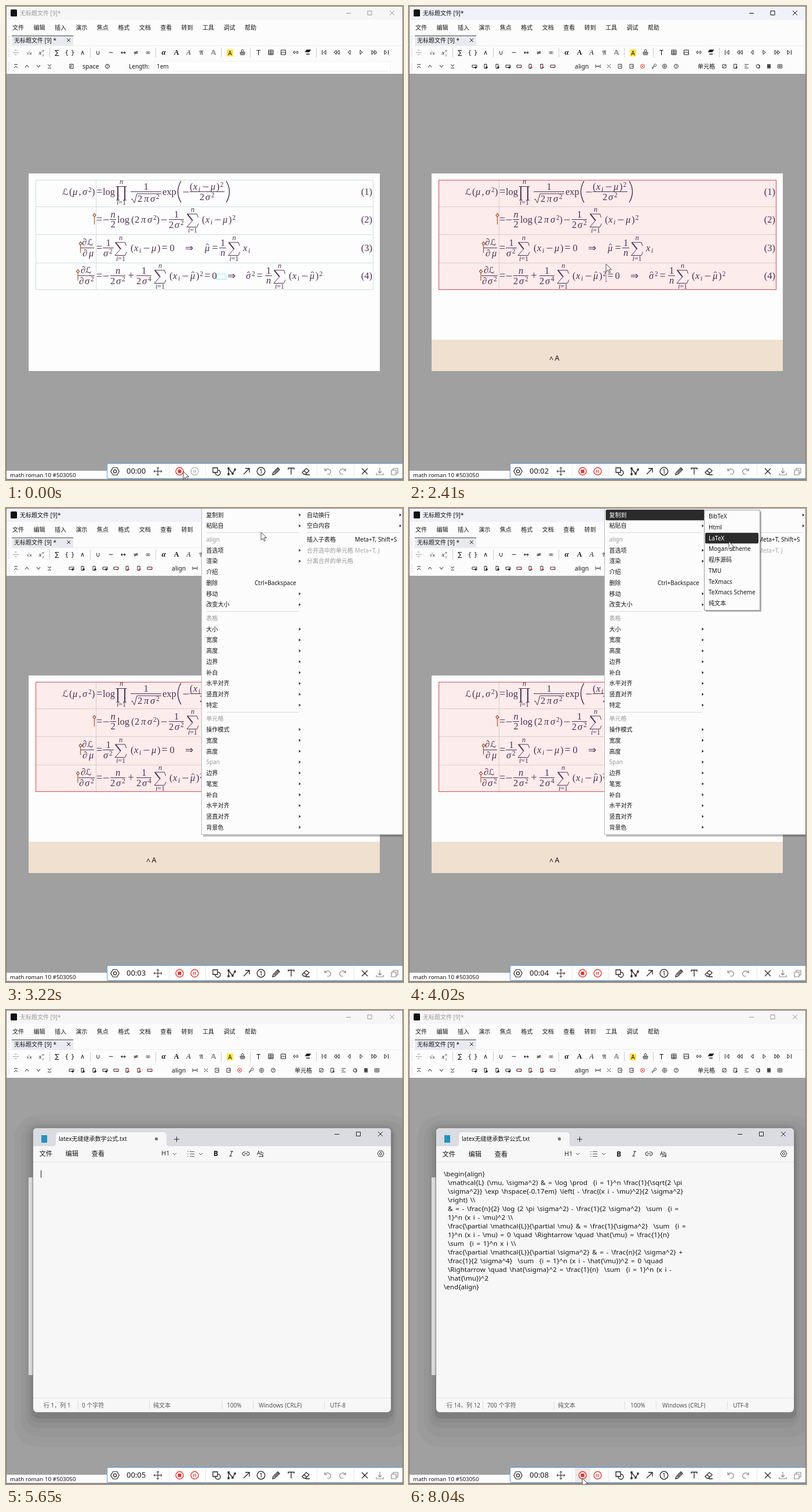
Recreate the animation shown at these times as an HTML page. Size 685 by 818 pixels, loop 8230 ms.

```html
<!DOCTYPE html>
<html lang="zh">
<head>
<meta charset="utf-8">
<title>Copy formulas as LaTeX</title>
<style>
html, body { margin: 0; width: 100%; height: 100%; overflow: hidden; background: #a0a0a0; }
svg { display: block; fill: #151515; font: 10px 'Noto Sans', 'Noto Sans CJK SC', 'Noto Sans CJK', sans-serif; }
text { white-space: pre; }
.math { fill: #503050; font: 16.5px 'Liberation Serif', 'DejaVu Sans', serif; }
.math .line { stroke: #503050; }
.sym { font-family: 'DejaVu Sans', sans-serif; }
.serif { font-family: 'Liberation Serif', serif; }
.it { font-style: italic; }
.mid { text-anchor: middle; }
#code { word-spacing: 1.7px; }
.row rect { fill: none; }
.row.off { fill: #999; }
.row.hot { fill: #fff; }
.row.hot rect { fill: #2b2b2b; }
</style>
</head>
<body>
<svg id="stage" width="685" height="818" viewBox="0 0 685 818"></svg>
<script>
const text = (x, y, s, o = '') => `<text x="${x}" y="${y}" ${o}>${String(s).replace(/&/g, '&amp;')}</text>`;
const rect = (x, y, w, h, o = '') => `<rect x="${x}" y="${y}" width="${w}" height="${h}" ${o}/>`;
const line = (d, o = '') => `<path class="line" d="${d}" ${o} ${o.includes('fill=') ? '' : 'fill="none"'} ${o.includes('stroke="') ? '' : 'stroke="#222"'}/>`;
const icon = (x, y, d, o = '') => line(d, `transform="translate(${x} ${y})" ${o}`);
const group = (id, s, o = '') => `<g id="${id}" ${o}>${s}</g>`;
const glyph = (x, y, s, size, o = 'class="sym mid"') => text(x, y, s, `${o} font-size="${size}"`);
const ring = r => `M${-r} 0a${r} ${r} 0 1 0 ${2 * r} 0a${r} ${r} 0 1 0 ${-2 * r} 0`;
const box = (w, h) => `M${-w / 2} ${-h / 2}h${w}v${h}h${-w}z`;
const red = 'stroke="#e53935"';
const gear = r => ring(r * .37) + `M${-r} 0L${-r / 2} ${-r * .87}H${r / 2}L${r} 0 ${r / 2} ${r * .87}H${-r / 2}z`;

// ---- main window ----
function titleBar() {
  return rect(1, 1, 683, 23, 'id="bar"') + group('title',
    text(24, 16, '无标题文件 [9]*', 'fill="currentColor"') +
    line('M587 12.500h8M624 8.500h7v7h-7zM662 8l8 8m0-8l-8 8', 'stroke="currentColor"')) +
    rect(8, 6, 11, 12, 'rx="1.5" fill="#111"');
}

function mainTools() {
  let s = '';
  '文件 编辑 插入 演示 焦点 格式 文档 查看 转到 工具 调试 帮助'.split(' ')
    .forEach((w, i) => s += text(11 + 36.45 * i, 40.5, w));
  s += rect(10, 51, 106, 17, 'fill="#e8eaf0"') + line('M10 51.5h106', 'stroke="#444"') +
    text(14, 62.5, '无标题文件 [9] *') + line('M105 56l6 6m0-6l-6 6') + line('M1 68.500h683', 'stroke="#ececec"');
  for (const y of [52, 74, 98]) s += line(`M5 ${y}v13`, 'stroke="#aaa" stroke-dasharray="1 2"');
  for (const x of [75.5, 145.5, 258.5, 371.5, 421.5, 535.5]) s += line(`M${x} 72v17`, 'stroke="#ccc"');
  s += icon(17, 80, 'M-5 .5h10M-2-4h4M-2 4h4', 'stroke="#777" stroke-dasharray="2 1"') +
    glyph(40, 84, '√x', 9, 'class="serif it mid"') + glyph(59, 84, 'x', 11, 'class="serif it mid"') +
    glyph(64, 79, 'n', 7, 'class="serif it mid"') + glyph(64, 87, 'i', 7, 'class="serif it mid"');
  [[88, '∑'], [110, '{ }'], [132, '∧'], [159, '∪'], [181, '∼'], [202, '↔'], [224, '≠'], [245, '∞']]
    .forEach(([x, c]) => s += glyph(x, 84, c, 11));
  s += glyph(272, 84, 'α', 13, 'class="serif it mid" font-weight="bold"') +
    glyph(294, 84, 'A', 12, 'class="serif mid" font-weight="bold"') +
    glyph(315, 84, 'A', 12, 'class="serif it mid"') + glyph(337, 84, '𝔄', 11) + glyph(358, 84, '𝔸', 11) +
    rect(381, 75, 11, 12, 'fill="#ffe34d"') + text(386.5, 84.5, 'A', 'class="mid"') +
    icon(408, 80, 'M-4 4h8M-4 2v-2h8v2zM-1 0v-1a2 2 0 1 1 2 0v1') + glyph(435.5, 84.5, 'T', 12, 'class="mid"') +
    icon(457, 80, box(8, 8) + 'M-4-1h8M-4 2h8M0-4v8') + icon(478.5, 80, box(8, 8) + 'M-4 2l3-3 2 2 1-1 2 2M1-2h1') +
    icon(500, 80, 'M-1-2h-1a2 2 0 0 0 0 4h1M1-2h1a2 2 0 0 1 0 4h-1M-2 0h4') +
    icon(521, 80, 'M-4-1l2-3h6l-2 3zM-3 3h6', 'fill="#111" stroke-width="1.6"');
  const tri = (x, k) => icon(x, 80, `M${-2 * k}-3.5L${2 * k} 0 ${-2 * k} 3.5z`);
  s += line('M545.5 76v8M659.5 76v8') + tri(550, -1) + tri(568, -1) + tri(573, -1) + tri(592, -1) +
    tri(613, 1) + tri(633, 1) + tri(638, 1) + tri(655, 1);
  [[17, 'M-3-3h6M-3 3l3-3 3 3'], [36, 'M-3 2l3-4 3 4'], [56, 'M-3-2l3 4 3-4'], [75, 'M-3 3h6M-3-3l3 3 3-3']]
    .forEach(([x, d]) => s += icon(x, 104, d));
  return s;
}

function spaceBar() {
  return icon(113, 104, box(6, 7) + 'M-1 2v-3h2') + text(132, 107.5, 'space', 'font-size="10.5"') +
    icon(175, 104, ring(3.5)) + glyph(175, 106.5, '?', 7, 'class="mid"') +
    text(212, 107.5, 'Length:') + rect(256.5, 95.5, 407, 17, 'fill="#fff" stroke="#f0f0f0"') + text(260, 107.5, '1em');
}

function alignBar() {
  let s = '';
  [113, 132, 152, 171, 190, 209, 229, 248].forEach((x, i) => {
    const tall = i % 4 === 1 || i % 4 === 2, hot = i > 3;
    s += icon(x, 104, tall ? box(4, 7) : box(8, 4)) +
      icon(x + 2, 106, 'M-2 0h4' + (hot ? '' : 'M0-2v4'), hot ? red + ' stroke-width="1.8"' : 'stroke-width="1.6"');
  });
  s += text(286, 107.5, 'align', 'font-size="10.5"') + text(498, 107.5, '单元格');
  [[326, 'M-4-3v6M4-3v6M-3 0h6M-1-1l-1 1 1 1M1-1l1 1-1 1'], [345, 'M-3-3l6 6M3-3l-2 2M-3 3l2-2'],
    [364, box(6, 7) + 'M3 0h-4l1-1'], [384, box(6, 7) + 'M-1 0h4l-1-1'], [422, 'M-3 3l4-4a2 2 0 1 1 1 1l-4 4z'],
    [441, gear(4)], [461, ring(3.5)], [544, box(6, 6) + 'M-2 2l4-4'], [563, box(5, 7) + 'M0 2h4M2 0v4'],
    [582, 'M-3-3h7M-3 0h4M-3 3h7'], [602, ring(3) + 'M0-2h3v5h-3'],
    [621, 'M-3-2.500h6M-3 0h6M-3 2.500h6'], [640, box(7, 6) + 'M-3 0h6M0-3v6']]
    .forEach(([x, d]) => s += icon(x, 104, d, x === 621 ? 'stroke-width="2.200"' : 'stroke-width=".9"'));
  return s + icon(403, 104, ring(3.5) + 'M-1.500-1.500l3 3m0-3l-3 3', red) + glyph(461, 106.5, '?', 7, 'class="mid"');
}

// ---- formulas ----
const m = (x, y, s, size = 16.5, o = '') => text(x, y, s, `font-size="${size}" ${o}`);
const it = (x, y, s, size) => m(x, y, s, size, 'class="it"');
const mc = (x, y, s, size, o = '') => m(x, y, s, size, `class="mid ${o}"`);
const sup = (x, y, n = 2) => m(x, y - 5, n, 11.5);
const hat = (x, y) => line(`M${x + 2} ${y - 10}l2.5-3 2.500 3`);
const bar = (a, b, y) => line(`M${a} ${y - 5.5}H${b}`);
const sig = (x, y, n = 2) => it(x, y, 'σ') + sup(x + 10, y, n);
const twoSig = (x, y, n) => m(x, y, 2) + sig(x + 10, y, n);
const eq = (x, y) => m(x + .5, y, '=', 18);
const minus = (x, y) => line(`M${x + .5} ${y - 5}h10`);
const script = (x, y) => m(x, y, 'ℒ', 15, 'class="sym"');
const limits = (x, y) => mc(x, y - 19, 'n', 12.5, 'it') + mc(x, y + 17, '<tspan class="it">i</tspan>=1', 12);
const sum = (x, y) => line(`M${x + 9.5} ${y - 9}l-2-6H${x - 9.5}l9 11.500-9.500 11H${x + 7.5}l2.500-6`) +
  line(`M${x - 9} ${y - 15}l9 11.500`, 'stroke-width="2"') + limits(x, y);
const prod = (x, y) => line(`M${x - 9.5} ${y - 14.5}h19M${x - 9} ${y + 9}h6M${x + 3} ${y + 9}h6`) +
  line(`M${x - 6} ${y - 14}v23M${x + 6} ${y - 14}v23`, 'stroke-width="2"') + limits(x, y);
const diff = (x, y, { hatted, square = true } = {}) => m(x, y, '(') + it(x + 6, y, 'x') + it(x + 15, y + 3, 'i', 11.5) +
  minus(x + 22, y) + it(x + 36, y, 'μ') + (hatted ? hat(x + 36, y) : '') + m(x + 46, y, ')') +
  (square ? sup(x + 52.5, y) : '');
const one = (a, b, y) => bar(a, b, y) + mc((a + b) / 2, y - 9, 1);
const mark = (x, y) => `<path d="M${x} ${y - 16}l2.500 3-2.500 3-2.500-3zm0 6v13" fill="none" stroke="#a8552e" stroke-width="1.200"/>`;
const implies = (x, y) => m(x, y, '⇒', 17, 'class="sym"');

function formulas() {
  let s = '', y = 326;
  s += script(97, y) + m(109, y, '(') + it(115, y, 'μ') + m(125.5, y, ',') + sig(132, y) + m(148, y, ')') +
    eq(155.5, y) + m(167, y, 'log') + prod(199, y) + one(215, 268, y) +
    line('M216 334l2-1 3.500 7 4.500-16H268') + m(227, 338, 2) + it(238, 338, 'π') + sig(249, 338) +
    m(270, y, 'exp') + line('M302 302q-11 18.500 0 37M380 302q11 18.500 0 37', 'stroke-width="1.400"') +
    minus(305, y) + bar(317, 377, y) + diff(317, 317) + twoSig(334, 335);
  y = 374;
  s += mark(152.5, y) + eq(155.5, y) + minus(167, y) + bar(179, 190, y) + mc(184.5, 365, 'n', 16.5, 'it') +
    mc(184.5, 382, 2) + m(192, y, 'log') + m(216, y, '(') + m(222, y, 2) + it(233, y, 'π') + sig(244, y) +
    m(259.5, y, ')') + minus(267, y) + one(281, 307, y) + twoSig(281, 383) + sum(322, y) + diff(338, y);
  y = 423;
  s += mark(128.5, y) + bar(129, 152, y) + it(131, 413, '∂') + script(140, 413) + it(132, 432, '∂') + it(143, 432, 'μ') +
    eq(155.5, y) + one(167, 186, y) + sig(168, 432) + sum(198, y) + diff(215, y, { square: false }) +
    eq(268, y) + m(282.5, y, 0) + implies(309, y) + it(343, y, 'μ') + hat(343, y) + eq(355, y) +
    one(368, 380, y) + mc(374, 431, 'n', 16.5, 'it') + sum(393.5, y) + it(409, y, 'x') + it(418, y + 3, 'i', 11.5);
  y = 471;
  s += mark(124, y) + bar(125, 153, y) + it(129, 461, '∂') + script(137, 461) + it(126, 480, '∂') + sig(136, 480) +
    eq(155.5, y) + minus(167, y) + bar(180, 206, y) + mc(193, 462, 'n', 16.5, 'it') + twoSig(180, 480) +
    m(210.5, y, '+', 18) + one(225, 251, y) + twoSig(225, 480, 4) + sum(266, y) + diff(282, y, { hatted: true }) +
    eq(342, y) + m(355.5, y, 0) + implies(382, y) + sig(414, y) + hat(414, y) + eq(432, y) + one(447, 459, y) +
    mc(453, 479, 'n', 16.5, 'it') + sum(472, y) + diff(488, y, { hatted: true });
  [326, 374, 423, 471].forEach((b, i) => s += m(632, b, `(${i + 1})`, 16.5, 'text-anchor="end"'));
  return s;
}

function page() {
  return rect(39, 289, 606, 341, 'fill="#fdfdfd"') +
    line('M51.5 300.500h582v189h-582zM51.5 346.500h582M51.5 394.500h582M51.5 443.500h582M155.500 300v189', 'stroke="#d0dddd"') +
    group('select', rect(51.5, 300.5, 582, 189, 'fill="#f00" fill-opacity=".065" stroke="#e0454f"') +
      line('M338.500 475.500h3M340 458v17', 'stroke="#b07878"')) +
    group('gap', rect(363.5, 462.5, 16, 9, 'fill="none" stroke="#8ee8ee"')) +
    group('math', formulas(), 'class="math"') +
    group('keys', rect(39, 576, 606, 54, 'fill="#f0e0d0"') + text(242, 613.5, '^', 'font-size="12.5"') +
      text(251.5, 612, 'A', 'font-size="12.5"'));
}

// ---- menus ----
const items = '复制到>|粘贴自>|-~align|首选项>|渲染>|介绍|删除|移动>|改变大小>|-~表格|大小>|宽度>|高度>|边界>|补白>|水平对齐>|竖直对齐>|特定>|' +
  '-~单元格|操作模式>|宽度>|高度>|~Span>|边界>|笔宽>|补白>|水平对齐>|竖直对齐>|背景色>';
const extra = '自动换行>|空白内容>|-插入子表格|~合并选中的单元格|~分离合并的单元格';
const formats = 'BibTeX|Html|LaTeX|Mogan Scheme|程序源码|TMU|TeXmacs|TeXmacs Scheme|纯文本';

function rows(list, x, y, w, name) {
  let s = '';
  y -= 18.75;
  for (const item of list.split('|')) {
    y += 18.75;
    if (item[0] === '-') {
      y += 4.7;
      s += line(`M${x} ${Math.round(y - 12) + .5}h${w - 11}`, 'stroke="#d8d8d8"');
    }
    const off = item.includes('~');
    s += `<g class="row ${name} ${off ? 'off' : ''}" data-y="${y}">` + rect(x - 6, y - 9.3, w, 18.6, 'rx="2"') +
      text(x, y + 3.7, item.replace(/[-~>]/g, '')) +
      (item.endsWith('>') ? `<path d="M${x + w - 11} ${y - 2.5}l3 2.500-3 2.500z" fill="#222"/>` : '') + '</g>';
  }
  return s;
}

function menu() {
  return rect(340, 3, 350, 564, 'fill="#000" opacity=".25"') + rect(337.5, -2, 352, 565.5, 'fill="#fcfcfc" stroke="#bbb"') +
    rows(items, 345.5, 12, 171, 'item') + rows(extra, 519, 12, 171, 'side') +
    text(429, 132.9, 'Ctrl+Backspace') + text(602, 57.9, 'Meta+T, Shift+S') + text(602, 76.6, 'Meta+T, J', 'fill="#aaa"') +
    group('sub', rect(512, 6, 96, 173, 'fill="#000" opacity=".3"') + rect(509.5, 3.5, 96, 173, 'fill="#fcfcfc" stroke="#999"') +
      rows(formats, 517, 14.5, 92, 'format'));
}

// ---- text editor ----
const source = String.raw`\begin{align}
\mathcal{L} (\mu, \sigma^2) & = \log \prod  {i = 1}^n \frac{1}{\sqrt{2 \pi
\sigma^2}} \exp \hspace{-0.17em} \left( - \frac{(x i - \mu)^2}{2 \sigma^2}
\right) \\
& = - \frac{n}{2} \log (2 \pi \sigma^2) - \frac{1}{2 \sigma^2}  \sum  {i =
1}^n (x i - \mu)^2 \\
\frac{\partial \mathcal{L}}{\partial \mu} & = \frac{1}{\sigma^2}  \sum  {i =
1}^n (x i - \mu) = 0 \quad \Rightarrow \quad \hat{\mu} = \frac{1}{n}
\sum  {i = 1}^n x i \\
\frac{\partial \mathcal{L}}{\partial \sigma^2} & = - \frac{n}{2 \sigma^2} +
\frac{1}{2 \sigma^4}  \sum  {i = 1}^n (x i - \hat{\mu})^2 = 0 \quad
\Rightarrow \quad \hat{\sigma}^2 = \frac{1}{n}  \sum  {i = 1}^n (x i -
\hat{\mu})^2
\end{align}`;

function status(id, dx, where, count) {
  const words = [[65, where], [131 + dx * 1.3, count], [254 + dx, '纯文本'], [381 + dx / 3, '100%'],
    [436 + dx / 3, 'Windows (CRLF)'], [559, 'UTF-8']];
  return group(id, words.map(([x, s]) => text(x, 686, s, 'fill="#555"')).join('') +
    [124.5 + dx, 247.5 + dx, 372.5, 426.5, 549.5].map(x => line(`M${x} 675v14`, 'stroke="#ddd"')).join(''));
}

function editor() {
  let s = '';
  [[14, 182, 690, 572, 40, .03], [26, 192, 664, 545, 30, .03], [34, 197, 640, 524, 22, .04], [40, 200, 630, 512, 16, .05], [44, 205, 624, 500, 12, .1]]
    .forEach(([x, y, w, h, r, a]) => s += rect(x, y, w, h, `rx="${r}" opacity="${a}"`));
  s += rect(46.5, 203.5, 618, 491, 'rx="7" fill="#f7f7f7" stroke="#8a8a8a"') +
    '<path d="M47 235v-24q0-7 7-7h603q7 0 7 7v24z" fill="#dadce1"/>' +
    '<path d="M82 235q4 0 4-5v-13q0-6 6-6h179q6 0 6 6v13q0 5 4 5z" fill="#f7f7f7"/>' +
    rect(61, 216, 10, 13, 'fill="#2492bf"') + text(91, 226, 'latex无缝继承数学公式.txt') +
    '<circle cx="259.500" cy="222.500" r="2.700" fill="#777"/>' +
    line('M290 223h9M294.500 218.500v9M567 214.500h8M604.500 210.500h7v7h-7zM642 210l8 8m0-8l-8 8') +
    ['文件', '编辑', '查看'].map((w, i) => text(57.5 + 45 * i, 252.5, w, 'font-size="11.3"')).join('') +
    text(268, 251.5, 'H1', 'fill="#333" font-size="11"') +
    line('M288 247l3 3 3-3M333 247l3 3 3-3M317 244.500h8M317 248.500h8M317 252.500h8M313 244.500h1.500M313 248.500h1.500M313 252.500h1.500', 'stroke="#555"') +
    text(358, 252.5, 'B', 'font-weight="bold" font-size="12"') + line('M387 244h5M385 252h5M390 244l-3 8') +
    icon(414, 248, 'M-1-3h-2a3 3 0 0 0 0 6h2M1-3h2a3 3 0 0 1 0 6h-2M-3 0h6') +
    text(433, 250.5, 'Ab', 'font-size="9"') + line('M436 253l8-1-2-2m2 2l-2 2') + icon(646.5, 248, gear(5.5)) +
    line('M47 262.500h617M47 669.500h617', 'stroke="#e4e4e4"') +
    group('code', source.split('\n').map((l, i) => text(i % 13 ? 67 : 60, 286.8 + 15 * i, l, 'font-size="11.6"')).join('')) +
    line('M0 0v13', 'id="caret"') + status('before', 0, '行 1，列 1', '0 个字符') + status('after', 3, '行 14，列 12', '700 个字符');
  return s;
}

// ---- recorder bar ----
function recorder() {
  const gray = 'stroke="#888"', y = 803, pause = ring(6.5) + 'M-1.500-2.500v5M1.500-2.500v5';
  let s = rect(1, 802, 174, 14, 'fill="#fcfcfc"') + text(7, 813, 'math roman 10 #503050', 'font-size="9.8"') +
    rect(174.5, 789.5, 520, 26, 'rx="2" fill="#fff" stroke="#5b9ae0"') + rect(286, 790, 27, 25, 'id="hover" fill="#eeeaea"') +
    icon(188, y, gear(7.2), 'stroke-width="1.200"') + text(208, 807, '00:00', 'id="clock" font-size="13"') +
    icon(262, y, 'M-7 0h14M0-7v14M-5-2l-2 2 2 2M5-2l2 2-2 2M-2-5l2-2 2 2M-2 5l2 2 2-2') +
    icon(299.5, y, ring(6.5), red + ' stroke-width="1.400"') +
    group('idle', '<circle cx="299.500" cy="803" r="3.200" fill="#e53935"/>' + icon(325.5, y, pause, gray)) +
    group('busy', rect(296.5, 800, 6, 6, 'fill="#e53935"') + icon(325.5, y, pause, red + ' stroke-width="1.400"'));
  for (const x of [281.5, 344.5, 536.5, 600.5]) s += line(`M${x} 791v23`, 'stroke="#e8e8e8"');
  [[363, 'M-6-6h8v8h-8zM-2 2a4.500 4.500 0 1 0 4-4'], [389, 'M-5 5v-10l7 9 4-7M-6 4h2v2h-2zM-6-6h2v2h-2zM1 3h2v2h-2zM5-4h2v2h-2z'],
    [415, 'M-5 5l10-10M-2-5h7v7'], [440, ring(6.8)], [466, 'M-6 6l1-4 8-8 3 3-8 8zM-3 3l7-7'],
    [492, 'M-5-3v-2.500h10v2.500M0-5.500v11'], [517, 'M-6 2l7-7 5 4-6 6h-3zM-3-1l5 4M0 6h7']]
    .forEach(([x, d]) => s += icon(x, y, d, 'stroke-width="1.300"'));
  [[555, 'M-5-5v4h4M-5-1q3-5 8-2t0 8h-4'], [581, 'M5-5v4h-4M5-1q-3-5-8-2t0 8h4'], [645, 'M0-6v9M-3 0l3 3 3-3M-6 3v3h12v-3'],
    [671, 'M-6-2h8v8h-8zM-3-2v-3h8v8h-3']].forEach(([x, d]) => s += icon(x, y, d, gray + ' stroke-width="1.200"'));
  return s + glyph(440, 807, '1', 10.5, 'class="mid"') + icon(619, y, 'M-5-5l10 10m0-10l-10 10', 'stroke-width="1.300"');
}

const $ = id => document.getElementById(id);
$('stage').innerHTML = rect(0, 0, 685, 818, 'fill="#a0a0a0"') + rect(1, 1, 683, 116, 'fill="#fcfcfc"') +
  titleBar() + mainTools() + group('space', spaceBar()) + group('align', alignBar()) + page() +
  group('menu', menu()) + group('editor', editor()) + recorder() +
  line('M.5.5h684v817h-684z', 'stroke="#7c7c7c"') +
  group('mouse', '<path id="arrow" d="M0 0v13.500l3.200-3 2.200 4.800 2-.9-2.200-4.700h4.300z" fill="#fff" stroke="#333" stroke-width=".9"/>' +
    line('M-3.500-6.500h2l1.500 1.500 1.500-1.500h2M0-5v10M-3.500 6.500h2l1.500-1.500 1.500 1.500h2', 'id="beam"'));

// ---- timeline ----
const path = [[40, 306, 803], [400, 430, 648], [590, 430, 648], [1060, 343, 571], [1660, 343, 571], [1900, 374, 510], [2230, 339, 448],
  [2420, 340, 445], [2600, 402, 265], [3020, 440, 42], [3220, 440, 42], [3380, 450, 14], [3650, 528, 13], [4020, 552, 58], [4200, 552, 58],
  [4330, 610, 566], [4480, 612, 570], [4800, 640, 830], [5700, 420, 830], [6210, 241, 447], [6400, 241, 447], [6540, 250, 450],
  [6670, 250, 450], [6730, 307, 426], [6930, 307, 426], [7250, 588, 560], [7760, 321, 795], [8040, 299, 808]];
const clamp = v => Math.max(0, Math.min(1, v));
const ramp = (t, a, b) => clamp((t - a) / (b - a));
const show = (id, on) => $(id).style.display = on ? '' : 'none';

function mouseAt(t) {
  const i = path.findIndex(p => p[0] > t);
  if (i < 0) return path[path.length - 1].slice(1);
  if (!i) return path[0].slice(1);
  const [a, b] = [path[i - 1], path[i]], k = ramp(t, a[0], b[0]);
  return [a[1] + (b[1] - a[1]) * k, a[2] + (b[2] - a[2]) * k];
}

function highlight(name, y) {
  for (const r of document.querySelectorAll('.' + name))
    r.classList.toggle('hot', Math.abs(r.dataset.y - y) < 9.38 && !r.classList.contains('off'));
}

function draw(t) {
  const active = t >= 1020 && t < 5420, aligned = t >= 1480;
  $('bar').setAttribute('fill', active ? '#f1f2f9' : '#f6f6f6');
  $('title').style.color = active ? '#111' : '#999';
  show('space', !aligned);
  show('gap', !aligned);
  show('align', aligned);
  show('select', aligned);
  show('keys', aligned && t < 4600);
  show('idle', t < 40);
  show('busy', t >= 40);
  show('hover', t >= 7900);
  $('clock').textContent = '00:0' + Math.floor(t / 1005);

  const [x, y] = mouseAt(t), [hx, hy] = mouseAt(t - 55), sub = t >= 3450;
  show('menu', t >= 2420 && t < 4330);
  $('menu').style.opacity = (.92 * ramp(t, 2400, 2560) + .08 * ramp(t, 2600, 3020)) * (1 - ramp(t, 4200, 4330));
  show('sub', sub);
  highlight('item', sub ? 12 : hy);
  highlight('format', hx > 511 ? Math.min(hy, 56) : -50);

  const open = 1 - (1 - ramp(t, 5420, 5660)) ** 3, typed = t >= 6400;
  show('editor', t >= 5420);
  $('editor').style.opacity = open;
  const k = .9 + .1 * open;
  $('editor').setAttribute('transform', `translate(${356 * (1 - k)} ${449 * (1 - k)}) scale(${k})`);
  show('code', typed);
  show('before', t < 6440);
  show('after', t >= 6440);
  show('caret', Math.floor((typed ? t - 6400 : t - 5500) / 545) % 2 === 0);
  $('caret').setAttribute('transform', typed ? 'translate(121 471.500)' : 'translate(60.500 276.500)');

  const beam = t > 5660 && y > 262 && y < 668;
  $('mouse').setAttribute('transform', `translate(${x} ${y})`);
  show('beam', beam);
  show('arrow', !beam);
}

const start = performance.now();
(function tick() {
  draw((performance.now() - start) % 8230);
  requestAnimationFrame(tick);
})();
</script>
</body>
</html>
```
